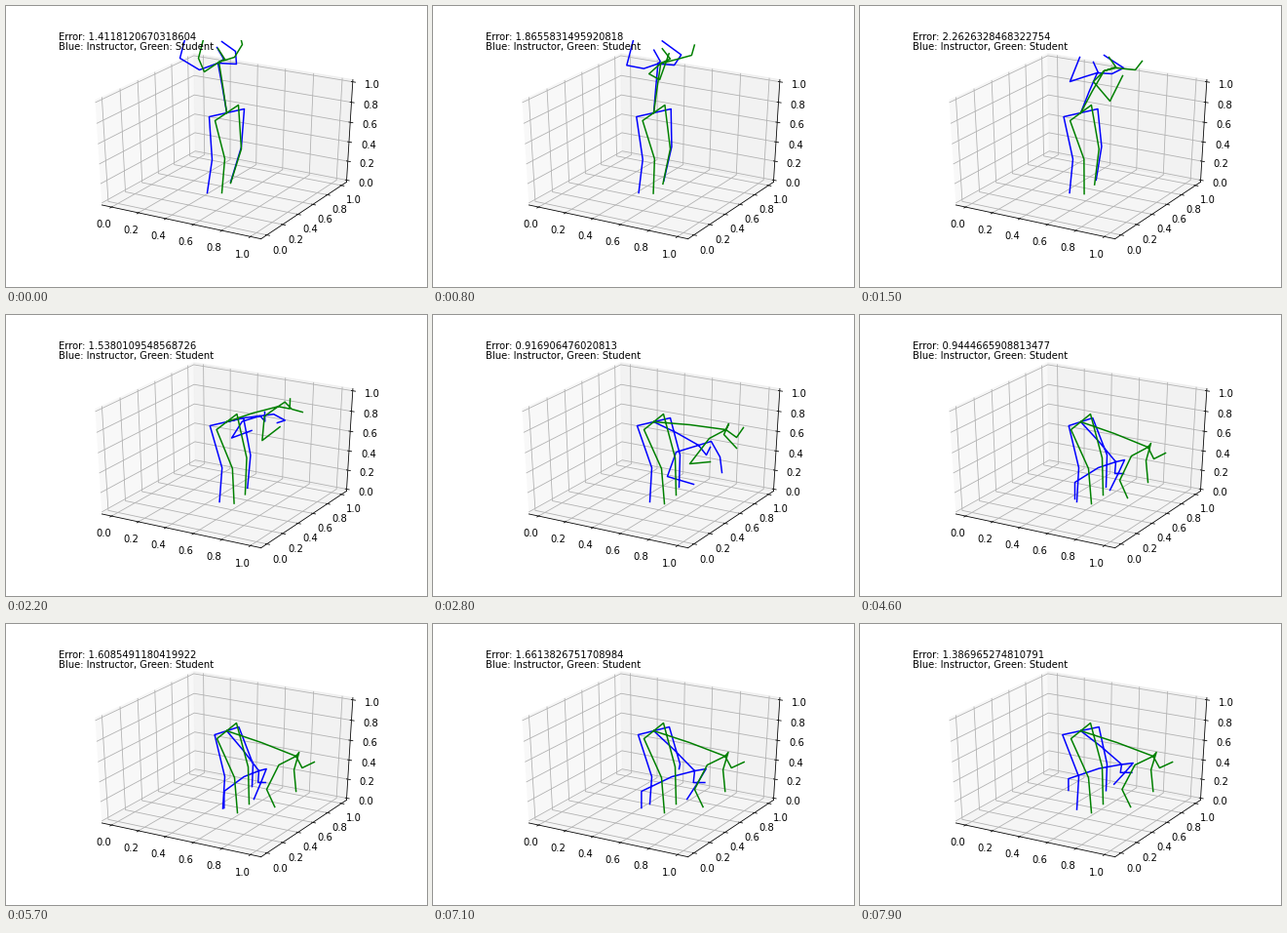
A matplotlib script that plays this animation: 432x288 px, repeating every 8 s.

```python
import numpy as np
import matplotlib.pyplot as plt
from matplotlib.animation import FuncAnimation
from matplotlib.patches import Polygon

plt.rcParams.update({"font.family": "DejaVu Sans", "font.size": 10})

W, H = 432, 288
LEFT, RIGHT, TOP, BOTTOM = 54, 388.8, 34.56, 252
FRAMES, STEP = 80, 100

fig = plt.figure(figsize=(W / 72, H / 72), dpi=72, facecolor="white")
ax = fig.add_axes([LEFT / W, 1 - BOTTOM / H, (RIGHT - LEFT) / W, (BOTTOM - TOP) / H])
ax.set(xlim=(LEFT, RIGHT), ylim=(BOTTOM, TOP))
ax.axis("off")

# Perspective view of a unit cube: elevation 30, azimuth -60, distance 10
DIST = 10
EL, AZ = np.radians([30, -60])
TOWARD = np.array([np.cos(EL) * np.cos(AZ), np.cos(EL) * np.sin(AZ), np.sin(EL)])
ACROSS = np.array([-np.sin(AZ), np.cos(AZ), 0])
UP = np.cross(TOWARD, ACROSS)


def project(points):
    d = np.asarray(points, float) - 0.5
    depth = DIST - d @ TOWARD
    sx = (d @ ACROSS / depth + 0.095) / 0.185
    sy = (d @ UP / depth + 0.095) / 0.185
    return LEFT + sx * (RIGHT - LEFT), BOTTOM - sy * (BOTTOM - TOP)


def draw(points, color, cap):
    ax.plot(*project(points), color=color, lw=0.8, solid_capstyle=cap, zorder=1)


DELTA = 1 / 12
LO, HI = -DELTA / 4, 1 + DELTA / 4


def pane(points, gray):
    color = (gray, gray, gray, 0.5)
    ax.add_patch(Polygon(np.column_stack(project(points)), closed=False,
                         facecolor=color, edgecolor=color, lw=1, zorder=1))


pane([(LO, LO, LO), (LO, HI, LO), (LO, HI, HI), (LO, LO, HI)], 0.95)
pane([(LO, HI, LO), (HI, HI, LO), (HI, HI, HI), (LO, HI, HI)], 0.90)
pane([(LO, LO, LO), (HI, LO, LO), (HI, HI, LO), (LO, HI, LO)], 0.925)


def draw_axis(edge, grid, tick, label, scale):
    """Each callable maps a position along the axis to points in the cube."""
    draw([edge(LO), edge(HI)], "black", "projecting")
    values = np.arange(6) / 5
    for v in values:
        draw(grid(scale(v)), "#b0b0b0", "butt")
    for v in values:
        draw(tick(scale(v)), "black", "projecting")
        x, y = project(label(scale(v)))
        ax.text(x, y, f"{v:.1f}", ha="center", va="top", zorder=1)


def padded(v):
    return (v + 0.05) / 1.1


# Label distance of 11.5 points, relative to the size of the axes
PAD = 11.5 * 48 / (RIGHT - LEFT + BOTTOM - TOP) * DELTA
NEAR, FAR = LO - PAD, HI + PAD
IN, OUT = 0.1 * DELTA, 0.2 * DELTA

draw_axis(lambda t: (t, LO, LO),
          lambda t: [(t, LO, LO), (t, HI, LO), (t, HI, HI)],
          lambda t: [(t, LO + IN, LO), (t, LO - OUT, LO)],
          lambda t: (t, NEAR, NEAR), padded)
draw_axis(lambda t: (HI, t, LO),
          lambda t: [(HI, t, LO), (LO, t, LO), (LO, t, HI)],
          lambda t: [(HI - IN, t, LO), (HI + OUT, t, LO)],
          lambda t: (FAR, t, NEAR), padded)
draw_axis(lambda t: (HI, HI, t),
          lambda t: [(LO, LO, t), (LO, HI, t), (HI, HI, t)],
          lambda t: [(HI - IN, HI, t), (HI + OUT, HI, t)],
          lambda t: (FAR, FAR, t), lambda v: v)

# Upper bodies pass through four poses, then only stretch about a pivot
POSE_MS = np.array([0, 1500, 2800, 4600], float)
SETTLE_MS = [4600, 5700, 7100, 7900]
ROOT = np.array([226, 109])
PIVOT = np.array([242, 128])
GAP = np.full((1, 2), np.nan)


def glide(keys, ms):
    """Smooth cubic path through the poses, coming to rest at the last."""
    slopes = np.gradient(keys, POSE_MS, axis=0)
    slopes[-1] = 0
    ms = min(ms, POSE_MS[-1])
    i = min(np.searchsorted(POSE_MS, ms, side="right"), len(POSE_MS) - 1) - 1
    span = POSE_MS[i + 1] - POSE_MS[i]
    s = (ms - POSE_MS[i]) / span
    return ((1 + 2 * s) * (1 - s) ** 2 * keys[i]
            + s * (1 - s) ** 2 * span * slopes[i]
            + s * s * (3 - 2 * s) * keys[i + 1]
            + s * s * (s - 1) * span * slopes[i + 1])


def upper(neck, arm_a, arm_b, head):
    return [neck, *arm_a, *arm_b, *head]


class Body:
    def __init__(self, color, poses, stand, shift, spread, squash=1, sway=0, lift=0):
        self.line, = ax.plot([], [], color=color, lw=1.5, zorder=2)
        self.poses = np.array(poses, float)
        self.stand, self.shift = np.array(stand, float), np.array(shift, float)
        self.spread, self.squash = spread, [1, 1, 1, squash]
        self.sway, self.lift = sway, lift

    def legs(self, ms):
        """Foot, knee, hip, root, hip, knee, foot."""
        p = self.stand + self.shift * min(ms / 2800, 1)
        if ms > 2800:
            p[2, 0] += self.sway * np.sin(np.pi * (ms - 2800) / 4600)
        rise = self.lift * np.exp(-((ms - 6700) / 900) ** 2)
        p[0, 1] -= rise / 4
        p[4, 1] -= rise
        return np.vstack([p[:3], [ROOT, 2 * ROOT - p[2]], p[3:]])

    def update(self, ms):
        scale = [np.interp(ms, SETTLE_MS, k) for k in (self.spread, self.squash)]
        p = PIVOT + (glide(self.poses, ms) - PIVOT) * scale
        neck = p[0]
        spine = [ROOT, (ROOT + neck) / 2 - (0, 1), neck, p[7], p[8]]
        arms = [*p[3:0:-1], neck, *p[4:7]]
        path = np.vstack([self.legs(ms), GAP, spine, GAP, arms])
        self.line.set_data(*(path + 0.5).T)


instructor = Body(
    "b",
    [upper((217, 58), [(198, 65), (178, 53), (184, 30)],
           [(236, 59), (235, 46), (221, 36)], [(223, 54), (216, 42)]),
     upper((243, 68), [(230, 72), (215, 77), (225, 52)],
           [(258, 69), (270, 63), (250, 50)], [(244, 68), (239, 57)]),
     upper((272, 133), [(249, 140), (240, 165), (267, 173)],
           [(285, 129), (294, 145), (296, 161)], [(280, 143), (284, 135)]),
     upper((262, 150), [(244, 156), (220, 171), (220, 188)],
           [(271, 148), (264, 163), (256, 179)], [(261, 162), (270, 162)])],
    stand=[(206, 191), (211, 157), (208, 113), (241, 144), (230, 180)],
    shift=[(16, 0), (13, -1), (1, 0), (12, -1), (22, -4)],
    spread=[1, 0.85, 1.3, 1.3], squash=0.7, sway=5, lift=34)

student = Body(
    "g",
    [upper((218, 57), [(203, 67), (197, 53), (203, 30)],
           [(234, 52), (242, 39), (240, 31)], [(224, 54), (217, 43)]),
     upper((250, 66), [(239, 77), (256, 97), (269, 71)],
           [(262, 63), (282, 65), (289, 56)], [(262, 62), (255, 52)]),
     upper((300, 117), [(283, 126), (263, 152), (284, 150)],
           [(303, 111), (298, 122), (311, 136)], [(311, 125), (318, 115)]),
     upper((295, 135), [(278, 144), (266, 169), (274, 187)],
           [(298, 131), (293, 149), (295, 171)], [(301, 147), (313, 141)])],
    stand=[(221, 191), (224, 156), (214, 117), (241, 146), (230, 181)],
    shift=[(16, 2), (10, 1), (2, 0), (7, 0), (19, 3)],
    spread=[1, 1.04, 1.08, 1.1])

ERRORS = {0: 1.4118120670318604, 1500: 2.2626328468322754, 2800: 0.916906476020813,
          4600: 0.9444665908813477, 5700: 1.6085491180419922,
          7100: 1.6613826751708984, 7900: 1.386965274810791}

error_text = ax.text(0, 1, "", transform=ax.transAxes, zorder=3)
ax.text(0, 0.95, "Blue: Instructor, Green: Student", transform=ax.transAxes, zorder=3)


def update(frame):
    ms = frame * STEP
    for body in (instructor, student):
        body.update(ms)
    error = float(np.interp(ms, list(ERRORS), list(ERRORS.values())))
    error_text.set_text(f"Error: {error}")
    return instructor.line, student.line, error_text


anim = FuncAnimation(fig, update, frames=FRAMES, interval=STEP, repeat=True, repeat_delay=0)
plt.show()
```
